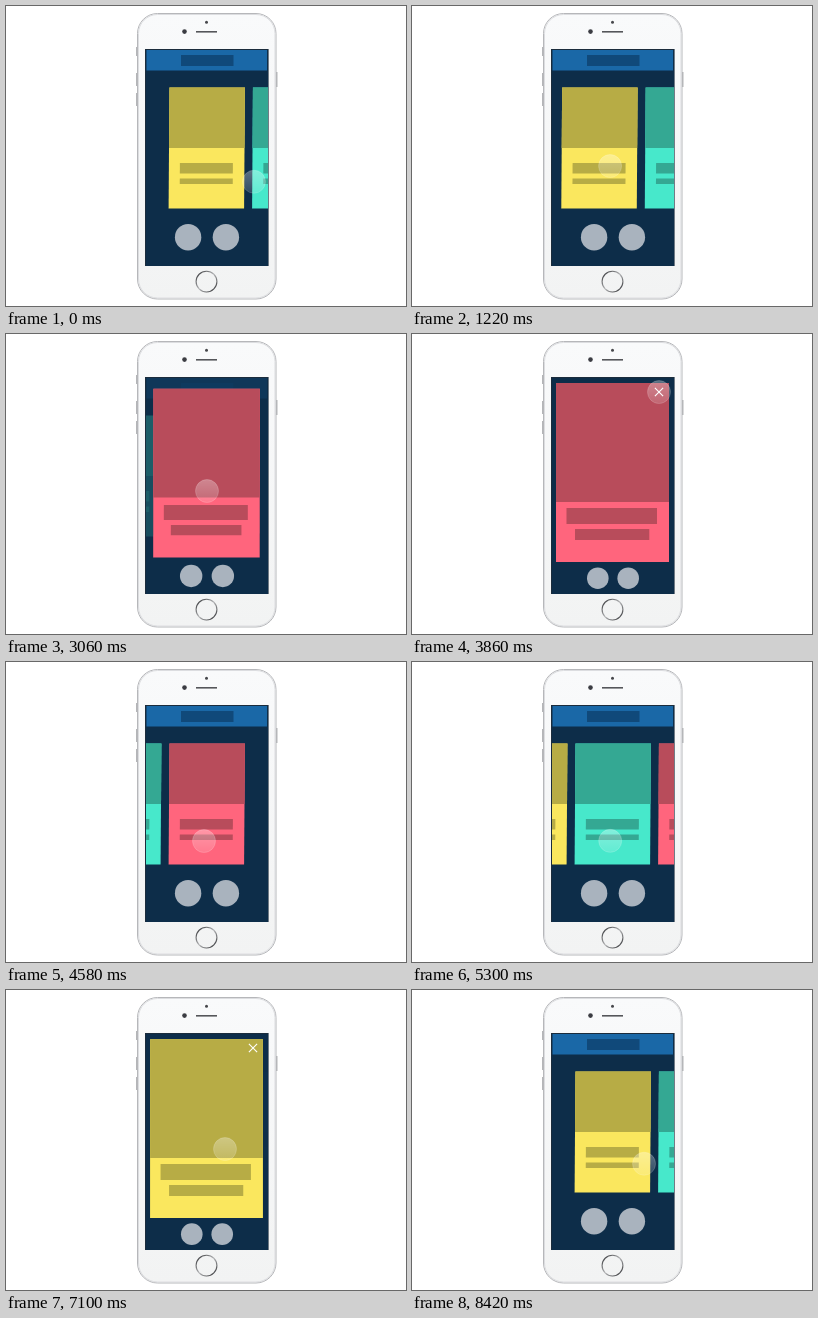
Recreate the animation shown at these times as an HTML page with a canvas. Size 400x300 px, loop 8.44 s.

```html
<!DOCTYPE html>
<html lang="en">
<head>
<meta charset="utf-8">
<title>Card carousel</title>
<style>
html, body { margin: 0; width: 100%; height: 100%; overflow: hidden; background: #fff; }
canvas { display: block; width: 400px; height: 300px; }
</style>
</head>
<body>
<canvas id="stage" width="400" height="300"></canvas>
<script>
const ctx = document.getElementById('stage').getContext('2d');
const LOOP = 8440, PITCH = 83.5, NAVY = '#0d2d49';
const CLOSE = { x: 247, y: 58 };
const CARDS = [
  { light: '#fae75e', dark: '#b7ac45' },
  { light: '#47e8cb', dark: '#34a893' },
  { light: '#ff657d', dark: '#b84c5b' }
];

const SWIPES = [
  { start: 1115, step: 1 }, { start: 2035, step: 1 },
  { start: 4590, step: -1 }, { start: 5450, step: -1 }
];
const VIEWS = [{ open: 2840, close: 3880 }, { open: 6680, close: 7680 }];

// Where the finger travels between gestures
const MOVES = [
  { start: 2500, time: 300, x: 201, y: 157 },
  { start: 3180, time: 500, ...CLOSE },
  { start: 3960, time: 540, x: 198, y: 179 },
  { start: 5250, time: 900, x: 219, y: 159 },
  { start: 7130, time: 380, ...CLOSE },
  { start: 7740, time: 440, x: 203, y: 170 },
  { start: 8366, time: 116, x: 266, y: 178 },
  { start: 8490, time: 810, x: 230, y: 160 }
];

const clamp = v => Math.max(0, Math.min(1, v));
const mix = (a, b, p) => a + (b - a) * p;
const span = (t, start, time) => clamp((t - start) / time);
const smooth = u => u * u * (3 - 2 * u);
const easeOut = u => 1 - (1 - u) ** 3;

// A drag that speeds up, then a snap that settles
function snap(u) {
  return u < 0.3 ? 0.4 * (u / 0.3) ** 2 : 0.4 + 0.6 * easeOut((u - 0.3) / 0.7);
}

function scrollAt(t) {
  return SWIPES.reduce((sum, s) => sum + s.step * snap(span(t, s.start, 560)), 0);
}

function openAt(t) {
  const grow = start => easeOut(span(t, start, 500));
  return VIEWS.reduce((sum, v) => sum + grow(v.open) - grow(v.close), 0);
}

function fingerAt(t) {
  // The last move runs on past the end of the loop
  const now = t < 900 ? t + LOOP : t;
  let { x, y } = MOVES[MOVES.length - 1];
  for (const m of MOVES) {
    const u = smooth(span(now, m.start, m.time));
    x = mix(x, m.x, u);
    y = mix(y, m.y, u);
  }
  for (const s of SWIPES) {
    const u = span(t, s.start, 680);
    x -= s.step * 56 * Math.sin(Math.PI * u ** 0.7) ** 2;
  }
  return { x, y };
}

function box(x1, y1, x2, y2, color) {
  ctx.fillStyle = color;
  ctx.fillRect(x1, y1, x2 - x1, y2 - y1);
}

function circle(x, y, r, fill, stroke, width) {
  ctx.beginPath();
  ctx.arc(x, y, r, 0, Math.PI * 2);
  if (fill) {
    ctx.fillStyle = fill;
    ctx.fill();
  }
  if (stroke) {
    ctx.strokeStyle = stroke;
    ctx.lineWidth = width;
    ctx.stroke();
  }
}

function line(x1, y1, x2, y2, color, width) {
  ctx.strokeStyle = color;
  ctx.lineWidth = width;
  ctx.beginPath();
  ctx.moveTo(x1, y1);
  ctx.lineTo(x2, y2);
  ctx.stroke();
}

function gradient(x1, y1, x2, y2, ...colors) {
  const g = ctx.createLinearGradient(x1, y1, x2, y2);
  colors.forEach((c, i) => g.addColorStop(i / (colors.length - 1), c));
  return g;
}

function outline(inset, stroke, fill) {
  ctx.beginPath();
  ctx.roundRect(131 + inset, 7 + inset, 139.5 - 2 * inset, 286.5 - 2 * inset, 20.5 - inset);
  if (fill) {
    ctx.fillStyle = fill;
    ctx.fill();
  }
  ctx.strokeStyle = stroke;
  ctx.lineWidth = 1;
  ctx.stroke();
}

function drawPhone() {
  for (const y of [41, 67, 87]) box(130, y, 132, y + (y < 50 ? 9 : 13), '#b4b5b8');
  box(269.5, 66, 271.5, 81, '#b4b5b8');
  outline(0.5, '#b6b7ba', gradient(0, 8, 0, 293, '#f9fafb', '#f2f3f3'));
  outline(1.5, '#dcdde0');
  circle(200.5, 16.3, 1.5, '#46474b');
  circle(178.5, 25.6, 2.3, '#3b3c42');
  line(190, 25.8, 211, 25.8, '#55565a', 1.6);
  const rim = gradient(192, 267, 209, 284, '#3f4043', '#b4b5b7', '#3f4043');
  circle(200.5, 275.6, 10.4, null, rim, 1.1);
}

function drawHeader() {
  box(140.5, 44, 261, 64.5, '#1a68a7');
  box(175, 49, 227.5, 60, '#10497a');
}

function drawCard(card, dx, p) {
  ctx.save();
  // Closed cards lean slightly
  ctx.transform(1, 0, -0.007 * (1 - p), 1, dx + (1 - p), 0);
  const x1 = mix(163, 144, p), x2 = mix(238.5, 257, p), top = mix(81.5, 49, p);
  box(x1, top, x2, mix(202.5, 228, p), card.light);
  box(x1, top, x2, mix(142, 168, p), card.dark);
  box(mix(174, 154.5, p), mix(157, 174, p), mix(227, 245, p), mix(167.5, 190, p), card.dark);
  box(mix(174, 163, p), mix(172.5, 195, p), mix(227, 237.3, p), mix(178, 206, p), card.dark);
  ctx.restore();
}

function drawClose(alpha) {
  const { x, y } = CLOSE, r = 4.1;
  ctx.globalAlpha = alpha;
  line(x - r, y - r, x + r, y + r, '#fff', 1.1);
  line(x - r, y + r, x + r, y - r, '#fff', 1.1);
  ctx.globalAlpha = 1;
}

function drawTouch({ x, y }) {
  const shade = gradient(0, y - 12, 0, y + 12, 'rgba(255,255,255,.33)', 'rgba(255,255,255,.14)');
  circle(x, y, 11.5, shade, 'rgba(255,255,255,.2)', 0.8);
}

function drawScreen(t) {
  const scroll = scrollAt(t), p = openAt(t), active = Math.round(scroll);
  box(139, 43, 262.6, 260, '#1b2c3c');
  ctx.save();
  ctx.beginPath();
  ctx.rect(140, 44, 122, 216);
  ctx.clip();
  box(140, 44, 262, 260, NAVY);

  ctx.globalAlpha = 1 - p;
  drawHeader();
  CARDS.forEach((card, i) => {
    if (i !== active) drawCard(card, (i - scroll) * PITCH, 0);
  });
  ctx.globalAlpha = 1;

  for (const side of [-1, 1]) {
    const x = 201 + side * mix(18.9, 15.2, p);
    circle(x, mix(231.2, 244.2, p), mix(13.2, 10.8, p), '#a9b3be');
  }
  drawCard(CARDS[active], (active - scroll) * PITCH, p);
  drawClose(clamp((p - 0.86) / 0.13));
  drawTouch(fingerAt(t));
  ctx.restore();
}

const began = performance.now();

function tick() {
  const t = (performance.now() - began) % LOOP;
  box(0, 0, 400, 300, '#fff');
  drawPhone();
  drawScreen(t);
  requestAnimationFrame(tick);
}
tick();
</script>
</body>
</html>
```
